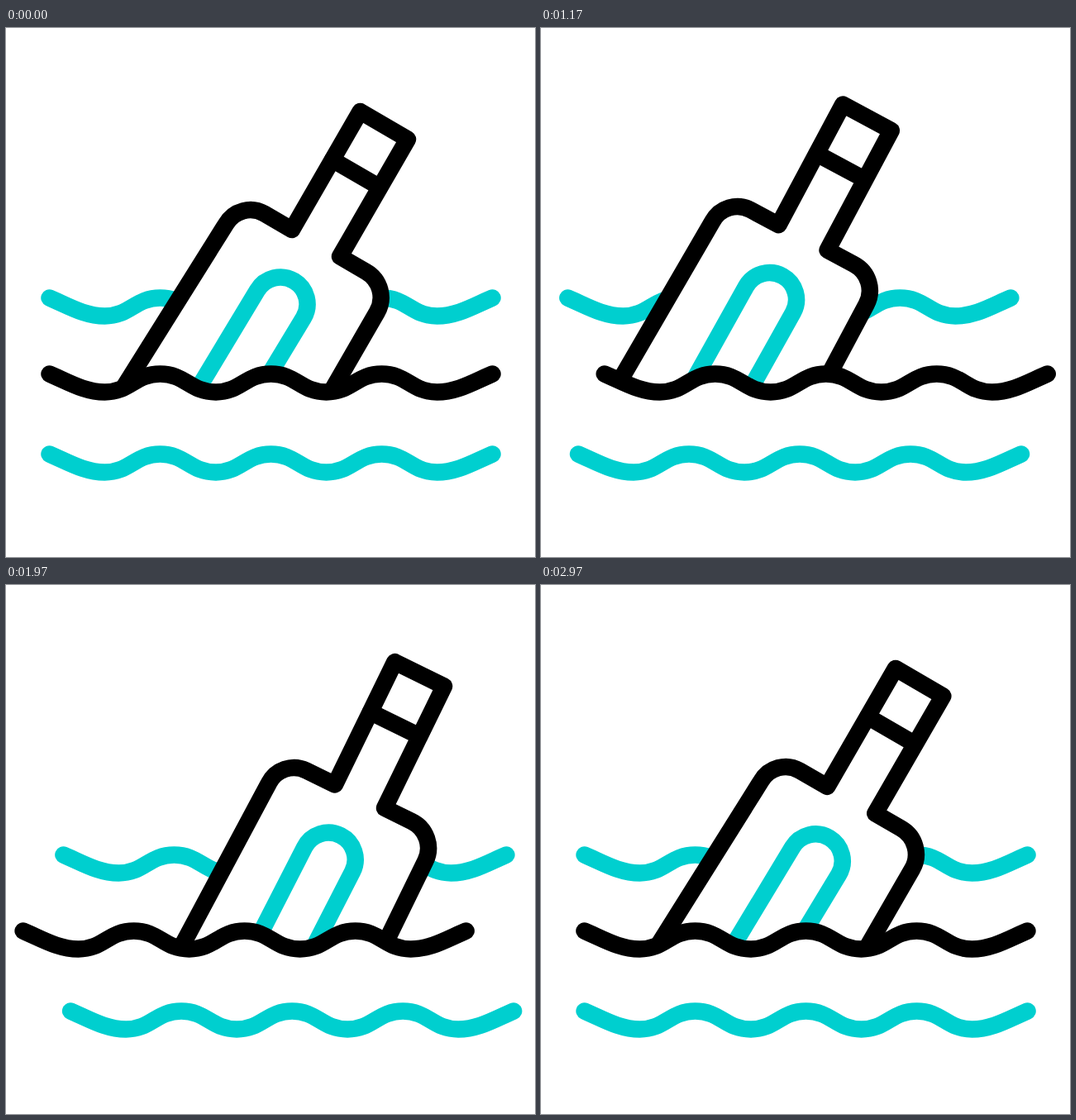
Write an HTML page that moves like this. It is 640 by 640 pixels and loops after 3 s.

```html
<!DOCTYPE html>
<html lang="en">
<head>
<meta charset="utf-8">
<title>Message in a bottle</title>
<style>
  html, body { margin: 0; width: 100%; height: 100%; overflow: hidden; background: #fff; }
  svg { display: block; width: 100%; height: 100%; }
</style>
</head>
<body>
<svg viewBox="0 0 640 640" fill="none" stroke="#000" stroke-width="20.5" stroke-linecap="round" stroke-linejoin="round">
  <defs>
    <path id="wave" d="M52.5 0C75 9.5 95 22 119.5 22C150 22 156 0 186.5 0S223 22 253.5 22S290 0 320.5 0S357 22 387.5 22S424 0 454.5 0S491 22 521.5 22C546 22 566 9.5 588.5 0"/>
    <clipPath id="aboveWater"><path id="waterline"/></clipPath>
  </defs>
  <use id="back" href="#wave" stroke="#00cfcf"/>
  <g clip-path="url(#aboveWater)">
    <g id="bottle">
      <path id="glass" fill="#fff" d="M114 480L266.2 237.1A34 34 0 0 1 312.6 224.7L346 244L428.5 101L486 134.5L404 276.5L435.6 294.8A36 36 0 0 1 448.8 344L370.3 480"/>
      <path d="M395 159.5L452 192.5"/>
      <path stroke="#00cfcf" stroke-linecap="butt" d="M206 480L304.1 317.3A32.5 32.5 0 0 1 359.9 350.7L281.8 480"/>
    </g>
  </g>
  <use id="middle" href="#wave"/>
  <use id="front" href="#wave" stroke="#00cfcf"/>
</svg>
<script>
const LOOP = 3000;
const PIVOT = [295, 399];
const el = id => document.getElementById(id);
const ease = u => (1 - Math.cos(Math.PI * u)) / 2;

// Keys are [time, value, sag]; sag bows the stretch that leads to the key.
function track(keys, t) {
  const i = keys.findIndex(key => t < key[0]);
  const [t0, v0] = keys[i - 1];
  const [t1, v1, sag = 0] = keys[i];
  const p = ease((t - t0) / (t1 - t0));
  return v0 + (v1 - v0) * p + 4 * sag * p * (1 - p);
}

const waves = [
  { id: "back", y: 326.5, left: -23, right: 17 },
  { id: "middle", y: 418.5, left: 28.5, right: -32 },
  { id: "front", y: 515.5, left: -10, right: 25.7 }
].map(w => ({ ...w, keys: [[0, 0], [1000, w.left], [2000, w.right], [LOOP, 0]] }));

const bottleX = [[0, 0], [1000, -60.8], [2100, 67], [LOOP, 0]];
const bottleY = [[0, 0], [1000, -0.5, 18], [2100, 3, -17.8], [LOOP, 0, -16]];
const bottleTilt = [[0, 0], [500, 3.8], [1000, -3.7], [1570, 5], [2130, -6], [2550, 3.7], [LOOP, 0]];

el("waterline").setAttribute("d", el("wave").getAttribute("d") + "V-600H52.5Z");

function render(t) {
  for (const { id, y, keys } of waves) {
    const move = `translate(${track(keys, t)} ${y})`;
    el(id).setAttribute("transform", move);
    if (id === "middle") el("waterline").setAttribute("transform", move);
  }
  el("bottle").setAttribute("transform",
    `translate(${track(bottleX, t)} ${track(bottleY, t)}) rotate(${track(bottleTilt, t)} ${PIVOT})`);
}

const start = performance.now();
function tick() {
  render((performance.now() - start) % LOOP);
  requestAnimationFrame(tick);
}
tick();
</script>
</body>
</html>
```
